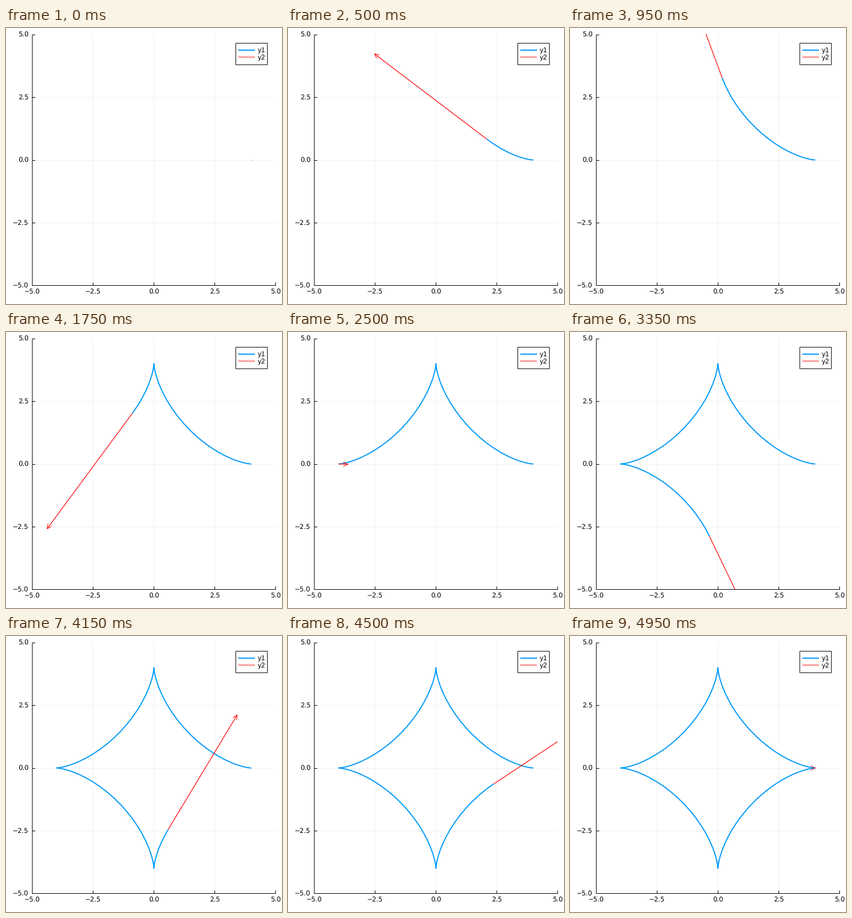
Write a matplotlib script that moves like this. It is 499 by 499 pixels and loops after 5000 ms.

```python
import numpy as np
import matplotlib.pyplot as plt
from matplotlib.animation import FuncAnimation
from matplotlib.patches import Rectangle

SIZE, DPI, FRAMES = 499, 64, 100
PT = 72 / DPI  # points per pixel
LEFT, RIGHT, TOP, BOTTOM = 47.4, 487.4, 11.9, 465.3
SX, SY = (RIGHT - LEFT) / 10, (BOTTOM - TOP) / 10
BLUE, RED = "#009afa", "#ff0000"
HEAD_LENGTH, HEAD_HALF = 8.5, 4.0

plt.rcParams["font.family"] = "DejaVu Sans"
plt.rcParams["text.hinting"] = "none"

fig = plt.figure(figsize=(SIZE / DPI, SIZE / DPI), dpi=DPI, facecolor="white")
ax = fig.add_axes([0, 0, 1, 1])
ax.set_xlim(0, SIZE)
ax.set_ylim(SIZE, 0)
ax.axis("off")


def px(x):
    return LEFT + (x + 5) * SX


def py(y):
    return BOTTOM - (y + 5) * SY


def line(xs, ys, color="black", width=1.0, z=2, **kw):
    return ax.plot(xs, ys, color=color, lw=width * PT, zorder=z, **kw)[0]


def label(x, y, text, align):
    ax.text(x, y, text, fontsize=11.85 * PT, ha=align, va="baseline", zorder=8)


def draw_axes():
    for v in (-5, -2.5, 0, 2.5, 5):
        x, y = px(v), py(v)
        if abs(v) < 5:
            line([x, x], [TOP, BOTTOM], "#f0f0f0", z=1)
            line([LEFT, RIGHT], [y, y], "#f0f0f0", z=1)
        line([x, x], [BOTTOM, BOTTOM - 5], z=5)
        line([LEFT, LEFT + 5], [y, y], z=5)
        text = f"{v:.1f}".replace("-", "\u2212")
        label(x, 480.5, text, "center")
        label(41, y + 4.4, text, "right")
    line([LEFT, LEFT], [TOP, BOTTOM], z=5)
    line([LEFT, RIGHT], [BOTTOM, BOTTOM], z=5)


def draw_legend():
    ax.add_patch(Rectangle((415.5, 27), 57, 38.8, fc="white", ec="black",
                           lw=PT, zorder=6))
    rows = ((40, "y1", BLUE, 2), (52.6, "y2", RED, 1))
    for y, name, color, width in rows:
        line([420, 450], [y, y], color, width, z=7, snap=False,
             solid_capstyle="butt")
        label(454.5, y + 4.4, name, "left")


draw_axes()
draw_legend()

# Astroid and its velocity
t = np.linspace(0, 2 * np.pi, FRAMES)
c, s = np.cos(t), np.sin(t)
X, Y = px(4 * c**3), py(4 * s**3)
U, V = -12 * c**2 * s * SX, -12 * s**2 * c * SY

area = Rectangle((LEFT, TOP - 0.5), RIGHT - LEFT, BOTTOM - TOP + 0.5,
                 transform=ax.transData)
dot = line([443, 444], [238.5, 238.5], "#555555", z=3, solid_capstyle="butt")
curve = line([], [], BLUE, 2, z=3, snap=False, solid_capstyle="butt",
             solid_joinstyle="round")
shaft = line([], [], RED, 1.25, z=4, snap=False, solid_capstyle="butt")
head = line([], [], RED, 1, z=4, snap=False, solid_capstyle="butt",
            solid_joinstyle="round")
for part in (curve, shaft, head):
    part.set_clip_path(area)


def update(k):
    dot.set_visible(k == 0)
    curve.set_data(X[:k + 1], Y[:k + 1])
    speed = np.hypot(U[k], V[k])
    if speed == 0:
        shaft.set_data([], [])
        head.set_data([], [])
    else:
        tip = np.array([X[k] + U[k], Y[k] + V[k]])
        along = np.array([U[k], V[k]]) / speed
        side = np.array([-along[1], along[0]]) * HEAD_HALF
        base = tip - along * HEAD_LENGTH
        shaft.set_data([X[k], tip[0]], [Y[k], tip[1]])
        head.set_data(*np.array([base + side, tip, base - side]).T)
    return dot, curve, shaft, head


anim = FuncAnimation(fig, update, frames=FRAMES, interval=50, repeat=True,
                     repeat_delay=0)
plt.show()
```
